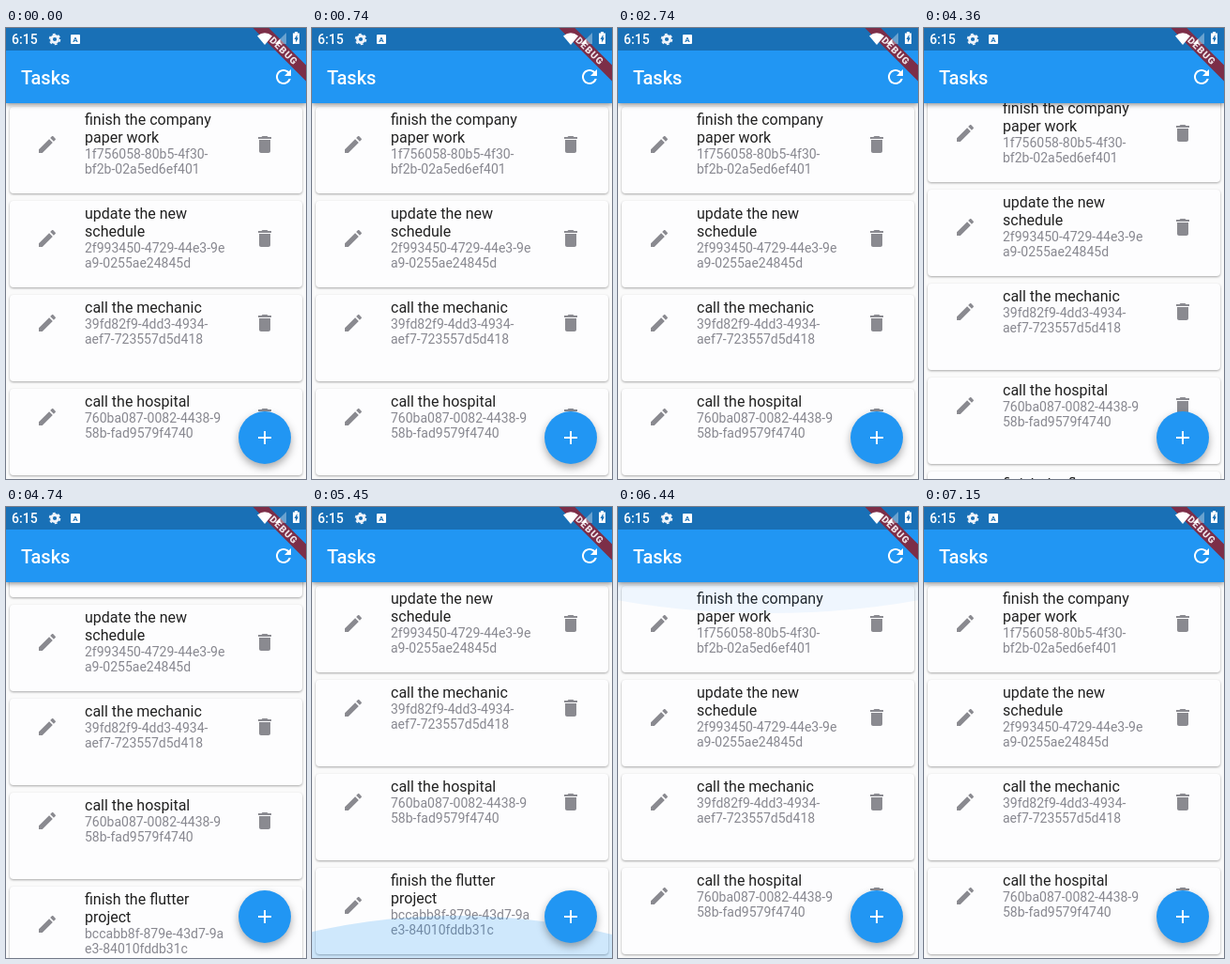
An HTML page for the animation above (7.69 s loop, 320x480 px).

```html
<!DOCTYPE html>
<html lang="en">
<head>
<meta charset="utf-8">
<title>Tasks</title>
<style>
  html, body { margin: 0; width: 100%; height: 100%; overflow: hidden; background: #fafafa; }
  svg { display: block; font-family: Roboto, sans-serif; }
  .card { fill: #fdfdfe; filter: drop-shadow(0 1px 1px #0005); }
  .name { font-size: 16px; fill: #212121; }
  .uid { font-size: 14px; fill: #888890; }
  .icon { fill: #8a8a90; }
  .bar { fill: #2196f3; filter: drop-shadow(0 2px 2.5px #0006); }
  .fab { fill: #2196f3; filter: drop-shadow(0 4px 4px #0005); }
  .glow { fill: #2196f3; }
</style>
</head>
<body>
<svg width="320" height="480" viewBox="0 0 320 480">
  <defs>
    <path id="edit" d="M3 17.25V21h3.75L17.81 9.94l-3.75-3.75L3 17.25zM20.71 7.04c.39-.39.39-1.02 0-1.41l-2.34-2.34c-.39-.39-1.02-.39-1.41 0l-1.83 1.83 3.75 3.75 1.83-1.83z"/>
    <path id="bin" d="M6 19c0 1.1.9 2 2 2h8c1.1 0 2-.9 2-2V7H6v12zM19 4h-3.5l-1-1h-5l-1 1H5v2h14V4z"/>
  </defs>
  <rect width="320" height="480" fill="#fafafa"/>
  <g id="list"></g>
  <circle class="glow" id="top" cx="160" cy="-413.7" r="480"/>
  <circle class="glow" id="bottom" cx="154" cy="-413.7" r="480"/>

  <circle class="fab" cx="276" cy="436" r="28"/>
  <path fill="#fff" transform="translate(264 424)" d="M19 13h-6v6h-2v-6H5v-2h6V5h2v6h6v2z"/>

  <rect class="bar" width="320" height="80"/>
  <rect width="320" height="24" fill="#1970b6"/>
  <text x="16" y="60" font-size="20" font-weight="500" fill="#fff">Tasks</text>
  <path fill="#fff" transform="translate(284 40)" d="M17.65 6.35C16.2 4.9 14.21 4 12 4c-4.42 0-7.99 3.58-7.99 8s3.57 8 7.99 8c3.73 0 6.84-2.55 7.73-6h-2.08c-.82 2.33-3.04 4-5.65 4-3.31 0-6-2.69-6-6s2.69-6 6-6c1.66 0 3.14.69 4.22 1.78L13 11h7V4l-2.35 2.35z"/>

  <g transform="translate(320 0) rotate(45)">
    <rect x="-40" y="28" width="80" height="12" fill="#7c2e48"/>
    <text x=".5" y="37.6" font-size="10.2" font-weight="900" letter-spacing="1" text-anchor="middle" fill="#f0e6ea">DEBUG</text>
  </g>

  <!-- status icons -->
  <g fill="#fff">
    <text x="6" y="17" font-size="14" font-weight="500">6:15</text>
    <g fill="none" stroke="#f0f4fa">
      <circle cx="52" cy="12" r="3.5" stroke-width="2.8"/>
      <circle cx="52" cy="12" r="5.4" stroke-width="1.8" stroke-dasharray="2.8 2.855"/>
    </g>
    <rect x="69" y="7" width="10" height="10" rx="1"/>
    <text x="74" y="15" font-size="8" font-weight="700" text-anchor="middle" fill="#1970b6">A</text>
    <path d="M268 8.5q8-6.5 16 0L276 18z"/>
    <path d="M299 5v12h-12z" opacity=".35"/>
    <path d="M292.5 11.5V17H287z"/>
    <path d="M308 4h3v1.5h2V17h-7V5.5h2z"/>
    <path d="M310.5 7l-3 5h1.5v3.5l3-5h-1.5z" fill="#1970b6"/>
  </g>
</svg>
<script>
const LOOP = 7690;
const $ = id => document.getElementById(id);
const tasks = [
  [["finish the company", "paper work"], ["1f756058-80b5-4f30-", "bf2b-02a5ed6ef401"]],
  [["update the new", "schedule"], ["2f993450-4729-44e3-9e", "a9-0255ae24845d"]],
  [["call the mechanic"], ["39fd82f9-4dd3-4934-", "aef7-723557d5d418"]],
  [["call the hospital"], ["760ba087-0082-4438-9", "58b-fad9579f4740"]],
  [["finish the flutter", "project"], ["bccabb8f-879e-43d7-9a", "e3-84010fddb31c"]]
];

const lines = (rows, cls, y, step) => rows.map((row, i) =>
  `<text class="${cls}" x="84" y="${y + i * step}">${row}</text>`).join("");

$("list").innerHTML = tasks.map(([name, uid], i) => {
  const tall = name.length > 1;
  const iconY = tall ? 112 : 102;
  return `<g transform="translate(0 ${i * 100})">
    <rect class="card" x="4" y="84" width="312" height="92" rx="4"/>
    ${lines(name, "name", 103, 19)}${lines(uid, "uid", tall ? 139 : 120, 16)}
    <use class="icon" href="#edit" x="32" y="${iconY}"/>
    <use class="icon" href="#bin" x="264" y="${iconY}"/></g>`;
}).join("");

const part = (t, from, to) => Math.min(1, Math.max(0, (t - from) / (to - from)));
const easeOut = p => 1 - (1 - p) ** 2;

function scrollAt(t) {
  if (t < 4360) return 0;
  if (t < 5850) return 12 + 88 * easeOut(part(t, 4430, 5030));
  return 100 * (1 - easeOut(part(t, 5850, 6370)));
}

// rises, holds, then recedes
const pulse = (t, start, full, release, end) =>
  part(t, start, full) * (1 - easeOut(part(t, release, end)));

function setGlow(id, place, size, alpha) {
  $(id).setAttribute("transform", `${place} scale(1 ${id === "top" ? size : -size})`);
  $(id).setAttribute("opacity", size ? alpha : 0);
}

function draw(t) {
  $("list").setAttribute("transform", `translate(0 ${-Math.round(scrollAt(t))})`);
  const low = pulse(t, 5200, 5450, 5750, 6350);
  const high = pulse(t, 6200, 6300, 6400, 6730) + pulse(t, 6840, 6920, 6920, 7150);
  setGlow("bottom", "translate(0 480)", 0.68 * low, 0.21 * low);
  setGlow("top", "translate(0 80)", 0.65 * high, 0.08 * high);
}

function tick() {
  draw(performance.now() % LOOP);
  requestAnimationFrame(tick);
}
tick();
</script>
</body>
</html>
```
